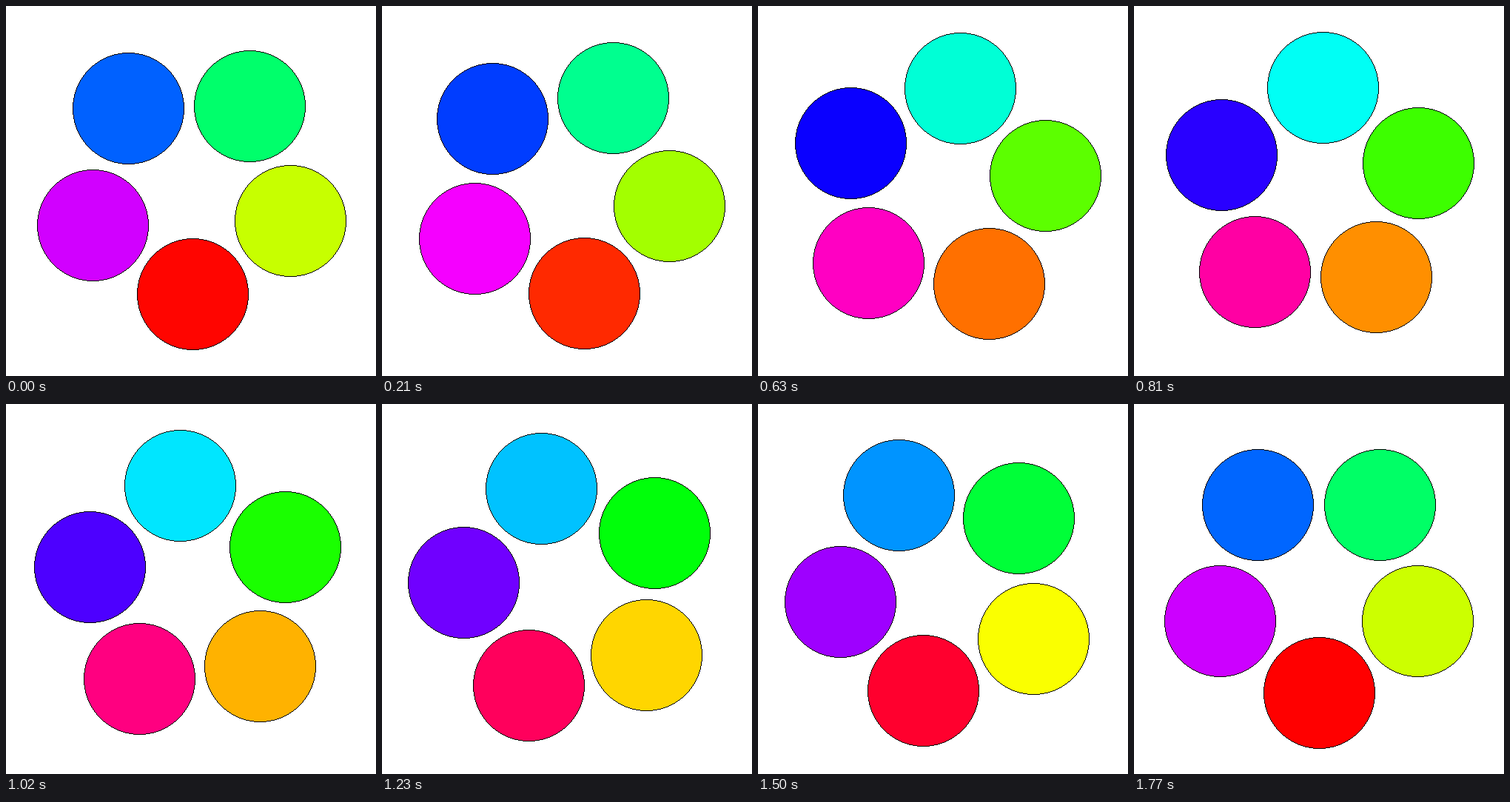
An HTML page with a canvas for the animation above (1.8 s loop, 500x500 px).

```html
<!DOCTYPE html>
<html>
<head>
<meta charset="utf-8">
<title>Colour wheel</title>
<style>
html, body { margin: 0; width: 100%; height: 100%; overflow: hidden; background: #fff; }
canvas { display: block; }
</style>
</head>
<body>
<canvas id="stage" width="500" height="500"></canvas>
<script>
const ctx = document.getElementById('stage').getContext('2d');
const DISCS = 5, R = 75, ORBIT = 140, STEP_MS = 30, STEPS = 60, STEP_DEG = 72 / STEPS;
const halfWidth = d => Math.round(Math.sqrt(R * R - d * d));

// Pixel-exact disc with a hard one-pixel outline
function disc(x, y, hue) {
  ctx.fillStyle = `hsl(${hue % 360}, 100%, 50%)`;
  for (let d = -R; d <= R; d++) {
    const w = halfWidth(d);
    ctx.fillRect(x - w, y + d, 2 * w + 1, 1);
  }
  ctx.fillStyle = '#000';
  for (let d = -53; d <= 53; d++) {
    const w = halfWidth(d);
    for (const s of [-w, w]) {
      ctx.fillRect(x + d, y + s, 1, 1);
      ctx.fillRect(x + s, y + d, 1, 1);
    }
  }
}

const place = v => Math.floor(250 + ORBIT * v + 1e-6);

function draw(t) {
  const step = Math.floor(t / STEP_MS) % STEPS + 1;
  ctx.fillStyle = '#fff';
  ctx.fillRect(0, 0, 500, 500);
  for (let i = 0; i < DISCS; i++) {
    const deg = step * STEP_DEG + i * 360 / DISCS;
    const a = deg * Math.PI / 180;
    disc(place(Math.sin(a)), place(Math.cos(a)), deg);
  }
}

let start;
function tick(now) {
  start ??= now;
  draw(now - start);
  requestAnimationFrame(tick);
}
draw(0);
requestAnimationFrame(tick);
</script>
</body>
</html>
```
